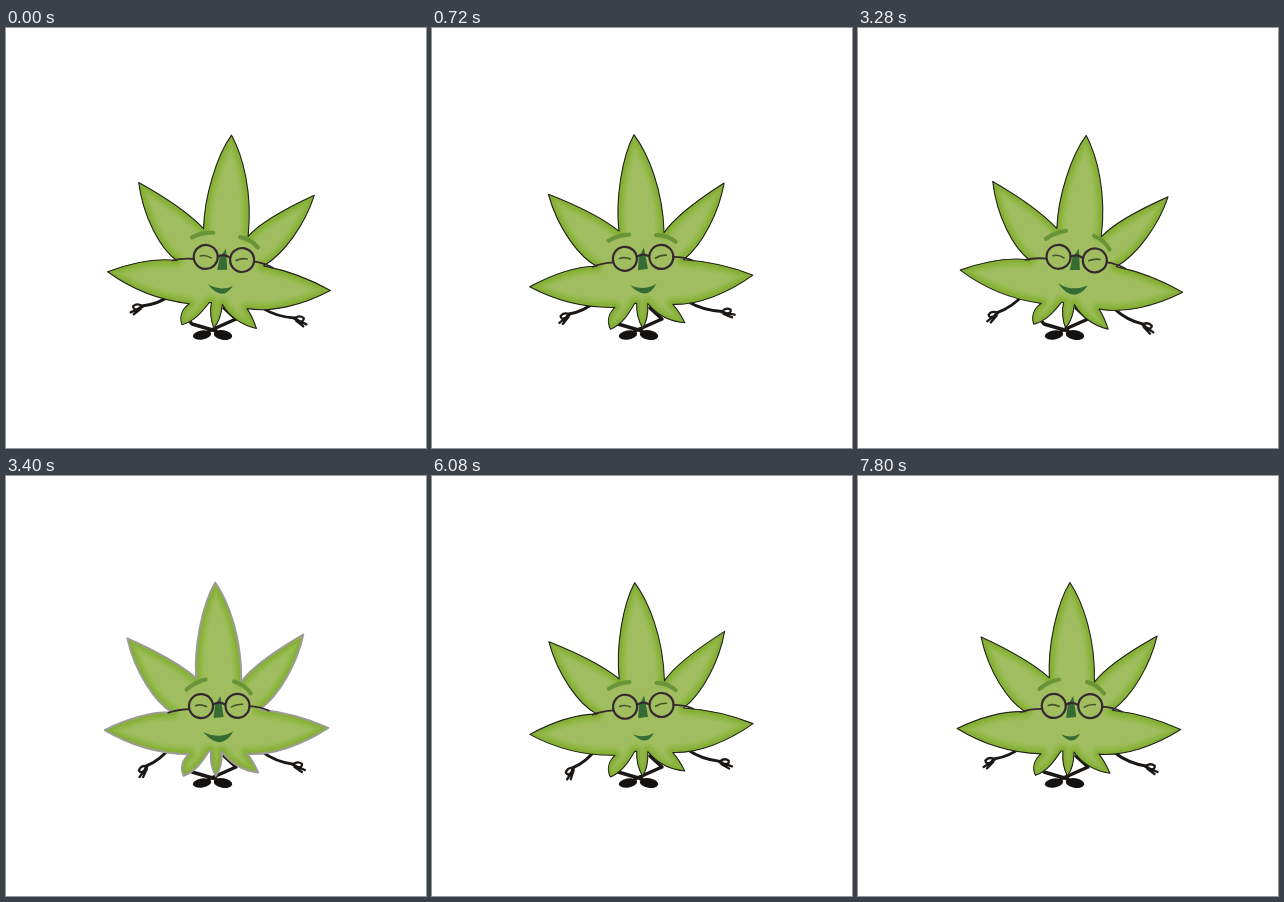
Animation of 420x420 px, one loop 8000 ms. Source, as an HTML page:

```html
<!DOCTYPE html>
<html lang="en">
<head>
<meta charset="utf-8">
<title>Meditating leaf</title>
<style>
  html, body { margin: 0; height: 100%; overflow: hidden; background: #fff; }
  svg { display: block; width: 100vw; height: 100vh; }
  .line { fill: none; stroke: #1a1715; stroke-linecap: round; stroke-linejoin: round; }
  .brow { fill: none; stroke: #6b9439; stroke-width: 4.2; stroke-linecap: round; }
  .frame { fill: none; stroke: #35292f; stroke-width: 2.2; }
  .eye { fill: none; stroke: #435528; stroke-width: 1.6; stroke-linecap: round; }
  .dark { fill: #346c33; }
</style>
</head>
<body>
<svg viewBox="0 0 420 420">
  <defs>
    <path id="shape" d="M211 106.5 C224 126 237 162 236 206 C248 190 273 174 298.5 159.5
      C292 188 274 220 254 234 C280 237 303 244 322.5 253 C296 270 266 280 241 278
      C245 283 249 290 252 297 C237 295 225 288 216 276 C216 286 214 294 209.5 300
      C206 293 204 284 205 275 L203 275 C197 284 190 295 177.5 299.5 C174 292 176 284 183 278
      C152 277 122 267 99 253 C122 242 145 235 167 236 C150 226 130 196 122.5 161.5
      C148 173 174 187 191 202 C189 170 198 128 211 106.5 Z"/>
    <clipPath id="inside"><use href="#shape"/></clipPath>
    <path id="hand" d="M0 0 Q3 -5 8 -3.5 Q10 0 5 1 Z M0 1 L13 1 M2 2 L11 4"/>
  </defs>

  <g class="line" stroke-width="2.9">
    <path stroke-width="3.4" d="M181 290 L186 296 L210 303 M218 280 L230 291 L203 303"/>
    <path id="armL"/>
    <path id="armR"/>
    <use id="handL" href="#hand" stroke-width="2.3"/>
    <use id="handR" href="#hand" stroke-width="2.3"/>
  </g>
  <g fill="#141210">
    <ellipse cx="196" cy="307" rx="9.3" ry="4.6" transform="rotate(-10 196 307)"/>
    <ellipse cx="217" cy="307" rx="9.3" ry="4.9" transform="rotate(10 217 307)"/>
  </g>

  <g id="leaf">
    <use href="#shape" fill="#a0be60"/>
    <g clip-path="url(#inside)" fill="none" stroke-linejoin="round">
      <use href="#shape" stroke="#99bb54" stroke-width="17"/>
      <use href="#shape" stroke="#90b645" stroke-width="12"/>
      <use href="#shape" stroke="#86b136" stroke-width="7"/>
    </g>
    <use id="outline" href="#shape" fill="none" stroke-linejoin="round"/>

    <path id="browL" class="brow" d="M180 211 Q190 205.5 201 206"/>
    <path id="browR" class="brow" d="M228 208 Q239 208.5 247 215.5"/>
    <path class="dark" d="M215 220 L218 241 L208 242 L209.5 229 Z"/>
    <g class="frame">
      <circle cx="195.5" cy="230" r="12"/>
      <circle cx="232" cy="230" r="12"/>
      <path d="M207 229 Q213.5 224.5 220 229"/>
      <path d="M162 236.5 Q172 233 184 233 M243 230.5 Q255 231 264 235.5" stroke-width="1.8"/>
    </g>
    <path class="eye" d="M190 229.5 Q195 227.5 201 230.5 M226 231 Q231 228 237 228.5"/>
    <path id="mouth" class="dark"/>
  </g>
</svg>

<script>
const LOOP = 8000, STEP = 40, PIVOT = [210, 280];
const inOut = k => k * k * (3 - 2 * k);
const out = k => 1 - (1 - k) ** 2;
const late = k => k ** 3;

// Each track: starting values, then moves [from, to, values, easing].
const tilt = [[4.8],
  [240, 720, [-3], inOut], [1560, 1840, [6.4], out],
  [3240, 3480, [-3], inOut], [6040, 6280, [0.3], inOut]];
// brow angle, half width of the mouth
const face = [[4, 12.5],
  [240, 720, [0, 13], inOut], [1560, 1840, [14, 15], late],
  [3920, 4160, [1, 10.5], inOut], [6040, 6280, [13, 9.5], inOut]];
// wrist x, wrist y, hand angle
const left = [[136, 278, 25],
  [240, 720, [137, 286, 38], inOut], [1560, 1840, [135, 275.5, 20], out],
  [2040, 2200, [139, 284, 35], inOut], [3240, 3480, [141, 292, 60], inOut],
  [6040, 6280, [140, 288, 50], inOut], [7640, 7800, [136, 283, 33], inOut]];
const right = [[289, 290, 25],
  [240, 720, [290, 283.5, 10], inOut], [1560, 1840, [285, 297, 36], inOut],
  [3240, 3480, [288, 285, 18], inOut], [6040, 6280, [288, 290, 23], inOut]];

function sample([start, ...moves], t) {
  let now = start;
  for (const [from, to, goal, ease] of moves) {
    if (t <= from) break;
    const k = ease(Math.min(1, (t - from) / (to - from)));
    now = now.map((v, i) => v + (goal[i] - v) * k);
  }
  return now;
}

function turn(x, y, degrees) {
  const a = degrees * Math.PI / 180, dx = x - PIVOT[0], dy = y - PIVOT[1];
  return [PIVOT[0] + dx * Math.cos(a) - dy * Math.sin(a),
          PIVOT[1] + dx * Math.sin(a) + dy * Math.cos(a)];
}

const set = (id, name, value) => document.getElementById(id).setAttribute(name, value);

function drawArm(side, shoulder, [x, y, angle], flip) {
  const [sx, sy] = shoulder;
  const cx = (sx + x) / 2 - 2 * flip, cy = (sy + y) / 2 + 4;
  set('arm' + side, 'd', `M${sx} ${sy} Q${cx} ${cy} ${x} ${y}`);
  set('hand' + side, 'transform', `translate(${x} ${y}) scale(${flip} 1) rotate(${angle})`);
}

function draw(t) {
  const [a] = sample(tilt, t), [brow, m] = sample(face, t);
  set('leaf', 'transform', `rotate(${a} ${PIVOT})`);

  // The outline softens while the leaf swings quickly.
  const speed = Math.abs(a - sample(tilt, Math.max(0, t - STEP))[0]);
  const soft = Math.min(1, (speed / 2) ** 3), grey = 35 + 120 * soft;
  set('outline', 'stroke', `rgb(${grey} ${grey} ${grey - 8})`);
  set('outline', 'stroke-width', 1.1 + 0.9 * soft);

  set('browL', 'transform', `rotate(${-brow} 190 207)`);
  set('browR', 'transform', `rotate(${brow} 238 210)`);
  const top = 258 - (m - 10) * 0.35;
  set('mouth', 'd', `M${212.5 - m} ${top} Q213 ${top + m * 0.5} ${212.5 + m} ${top - 0.5}
    Q${214 + m * 0.1} ${top + m * 1.35} ${212.5 - m} ${top} Z`);

  drawArm('L', turn(165, 270, a), sample(left, t), -1);
  drawArm('R', turn(256, 276, a), sample(right, t), 1);
}

const begin = performance.now();
function tick() {
  const t = (performance.now() - begin) % LOOP;
  draw(Math.floor(t / STEP) * STEP);
  requestAnimationFrame(tick);
}
tick();
</script>
</body>
</html>
```
